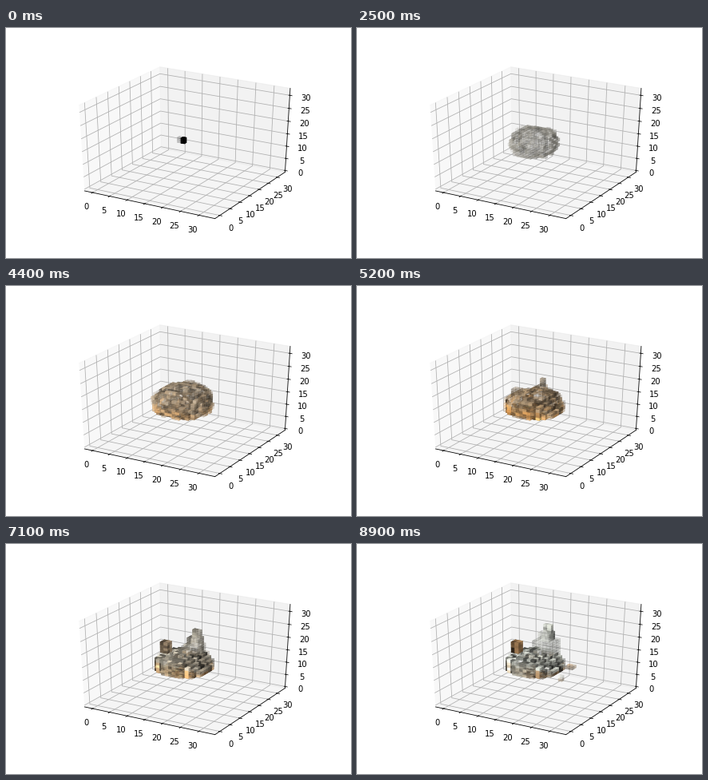
Recreate the animation shown at these times as a matplotlib script. Size 432 by 288 pixels, loop 9 s.

```python
import numpy as np
import matplotlib.pyplot as plt
from matplotlib.animation import FuncAnimation
from mpl_toolkits.mplot3d.art3d import Poly3DCollection

FRAMES, STEP_MS = 90, 100
LO, HI = np.array([8, 8, 8]), np.array([26, 26, 29])
SHAPE = tuple(HI - LO)
X, Y, Z = np.mgrid[8:26, 8:26, 8:29] + 0.5
DX, DY = X - 15.7, Y - 15.5

rng = np.random.default_rng(7)
PHASE = rng.uniform(0, 2 * np.pi, SHAPE)
RATE = rng.uniform(0.4, 1.6, SHAPE)
COLUMN = rng.uniform(-1, 1, SHAPE[:2] + (1,))
GREY_MIX = rng.uniform(0, 0.6, SHAPE[:2] + (1, 1))

GREY, OCHRE, SAND = np.array([(.46, .45, .42), (.76, .53, .28), (.80, .74, .64)])
BROWN, SLATE = np.array([(.52, .36, .20), (.64, .65, .62)])
SUN = np.array([-2, -2, 1]) / 3

# stepped roof with a raised left wall
ROOF = 19 - np.maximum(1.1 * abs(DX), 0.6 * abs(DY))
ROOF = np.where(DX < -3, np.maximum(ROOF, 15.6), ROOF)


def smooth(t, a, b):
    s = np.clip((t - a) / (b - a), 0, 1)
    return s * s * (3 - 2 * s)


def mix(a, b, k):
    return a + (b - a) * k


def cover(depth):
    return np.clip(2 * depth + 0.2, 0, 1)


def norm3(*parts):
    return sum(abs(p) ** 3 for p in parts) ** (1 / 3)


def box(cx, cy, half, z0, z1):
    """Depth inside an upright square column, negative outside."""
    side = half + 0.4 - np.maximum(abs(X - cx), abs(Y - cy))
    return np.minimum(np.minimum(side, Z - z0 + 0.4), z1 - Z + 0.4)


def state(t):
    noise = np.sin(PHASE + RATE * t)
    grown = smooth(t, 3.8, 6)

    # a soft lump that turns into the hall
    radius = 0.2 + 5.6 * np.sin(np.pi / 2 * min(t / 4.6, 1))
    cz = 16 - 0.8 * smooth(t, 0, 2)
    egg = radius + 0.7 - norm3(X - 15.4, DY, (Z - cz) / 0.95) + 0.3 * noise * smooth(t, 0, 1)
    hall = np.minimum(6.2 - norm3(DX, DY), ROOF - Z + 0.4)
    body = np.minimum(mix(egg, hall, grown), Z - 10.8)

    top = min(27, 18.5 + 1.6 * (t - 3.1))
    tx = 15.2 + 1.9 * smooth(t, 4, 8)
    tower = np.maximum(box(tx, 19.5, 0.4, 14, top), box(tx - 0.4, 19.5, 0.8, 14, top - 3))
    tower = np.maximum(tower, box(tx - 0.6, 19.5, 1.6, 14, top - 6.5))
    knob = min(21.5, 19.3 + 1.6 * (t - 5.2))
    head = box(12, 13, 0.8, knob - 3, knob)
    post = np.maximum(box(12.5, 13.5, 0.4, 12, knob), head)
    scraps = np.maximum(box(22, 22, 0.8, 10, 11), box(23.5, 14.5, 0.4, 9, 11))

    dense = mix(mix(1, 0.3, smooth(t, 0, 1)), 1, smooth(t, 2.2, 6))
    haze = np.clip(1 + 0.6 * noise * (1 - dense), 0, 1)
    rising = smooth(t, 2.6, 3.6) * mix(0.3, 0.9, smooth(t, 4.5, 8))
    alpha = np.maximum(cover(body) * dense * haze,
                       np.maximum(cover(tower), cover(post)) * rising)
    alpha = np.maximum(alpha, 0.25 * cover(scraps) * smooth(t, 7.9, 8.8))

    # grey first, then ochre, then sand walls with a brown flank
    warm, pale = smooth(t, 2.8, 5.4)[..., None], smooth(t, 6, 8.2)
    flank = smooth(DX, 0, 4)[..., None]
    wall = mix(OCHRE, mix(SAND, BROWN, flank), pale)
    wall = mix(wall, SLATE, GREY_MIX * mix(0.5, 1, pale))
    roof = np.clip(Z - ROOF + 1.4, 0, 1)[..., None]
    rgb = mix(wall, mix(GREY, SLATE, pale), roof * mix(0.6, 1, pale))
    rgb = mix(GREY, rgb, warm)
    rgb = mix(rgb, BROWN, (head > 0)[..., None] * 0.8 * pale)
    shade = 1 + mix(0.5, 0.25, grown) * noise + 0.45 * COLUMN * grown
    return np.clip(rgb * shade[..., None] * smooth(t, -0.1, 1.2) * (t > 0), 0, 1), alpha


def quad(axis, side):
    corners = np.zeros((4, 3))
    corners[:, axis] = side
    corners[:, (axis + 1) % 3] = [0, 1, 1, 0]
    corners[:, (axis + 2) % 3] = [0, 0, 1, 1]
    return corners


def faces(t):
    """Outer faces of all visible cells with their colours."""
    rgb, alpha = state(t)
    alive = np.pad(alpha > 0.08, 1)
    core = alive[1:-1, 1:-1, 1:-1]
    verts, colors = [], []
    for axis in range(3):
        for side in (0, 1):
            near = np.roll(alive, 1 - 2 * side, axis)[1:-1, 1:-1, 1:-1]
            cells = np.argwhere(core & ~near)
            idx = tuple(cells.T)
            light = 0.82 + 0.27 * SUN[axis] * (2 * side - 1)
            verts.append((cells + LO)[:, None, :] + quad(axis, side))
            colors.append(np.column_stack([rgb[idx] * light, alpha[idx]]))
    return np.concatenate(verts), np.concatenate(colors)


fig = plt.figure(figsize=(6, 4), dpi=72, facecolor="white")
fig.subplots_adjust(left=0.125, right=0.9, bottom=0.125, top=0.88)
ax = fig.add_subplot(projection="3d", elev=30, azim=-60)
ax.apply_aspect = lambda position=None: None  # fill the whole subplot
ax.set_box_aspect((1, 1, 1), zoom=3 ** 0.5 / 1.8294640721620434)
pad = 35.2 / 48
ax.set_xlim(-1.6 - pad, 33.6 + pad)
ax.set_ylim(-1.6 - pad, 33.6 + pad)
ax.set_zlim(-32 / 48, 32 + 32 / 48)
for axis in (ax.xaxis, ax.yaxis, ax.zaxis):
    axis.set_ticks(range(0, 31, 5))

cloud = Poly3DCollection(np.zeros((1, 4, 3)), linewidths=0.5)
ax.add_collection3d(cloud)


def draw(i):
    verts, colors = faces(0 if i < 2 else i * STEP_MS / 1000)
    cloud.set_verts(verts)
    cloud.set_facecolor(colors)
    cloud.set_edgecolor(colors)
    return [cloud]


anim = FuncAnimation(fig, draw, frames=FRAMES, interval=STEP_MS, repeat=True, repeat_delay=0, blit=False)
plt.show()
```
